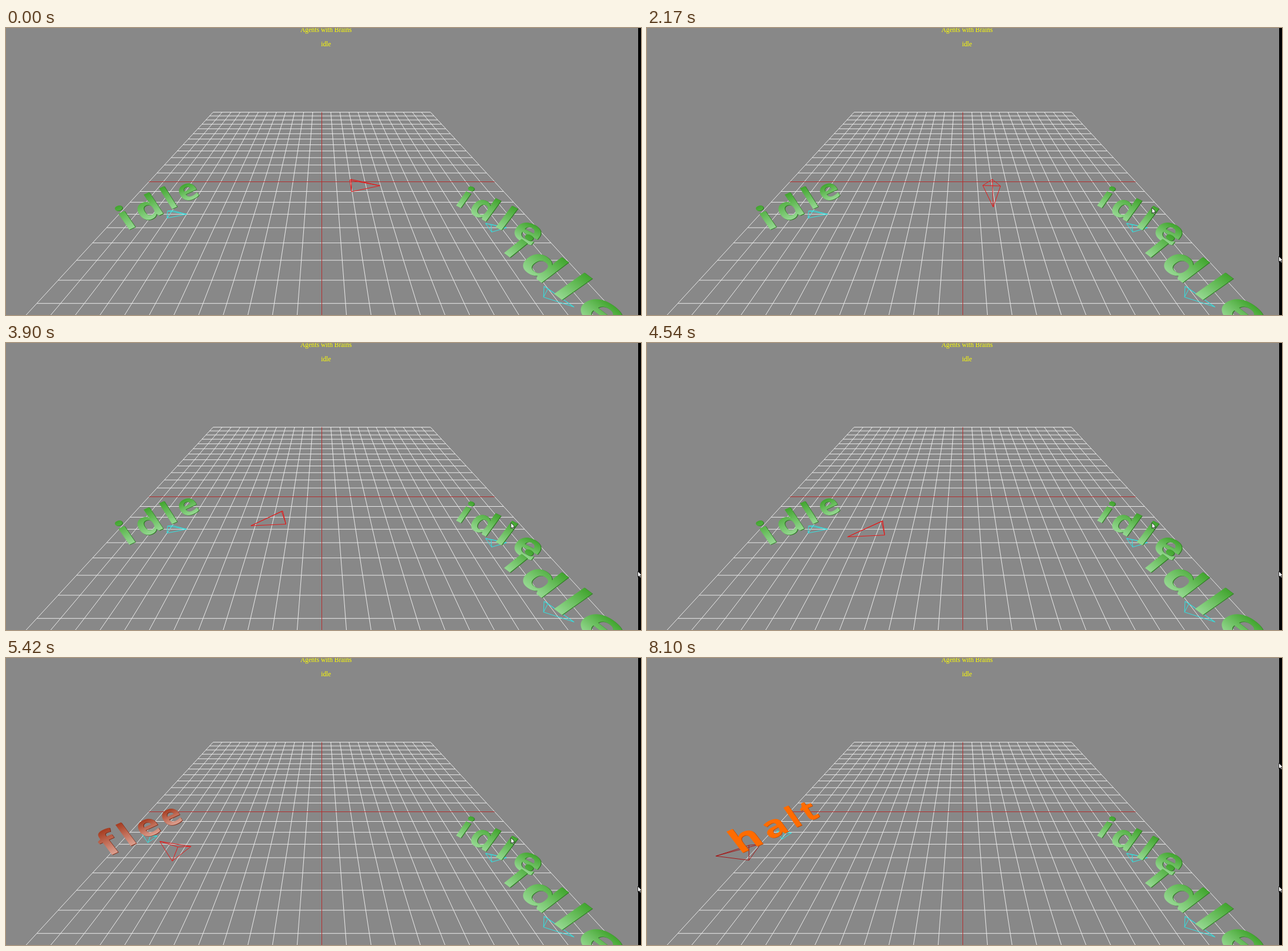
Write an HTML page with a canvas that moves like this. It is 1113 px wide and 503 px high and loops after 8.18 s.

```html
<!DOCTYPE html>
<html lang="en">
<head>
<meta charset="utf-8">
<title>Agents with Brains</title>
<style>
  html, body { margin: 0; width: 100%; height: 100%; overflow: hidden; background: #888; }
  canvas { display: block; }
</style>
</head>
<body>
<canvas id="stage" width="1113" height="503"></canvas>
<script>
const ctx = document.getElementById('stage').getContext('2d');
const LOOP = 8180;
const RAD = Math.PI / 180;

const ramp = (t, from, to) => Math.min(1, Math.max(0, (t - from) / (to - from)));
const mix = (a, b, p) => a + (b - a) * p;

// Camera at (0, 10, 12), looking at the origin
const CAM = { y: 10, z: 12, dist: Math.hypot(10, 12), focal: 394.4, cx: 553.5, cy: 269.5 };
const SIN = CAM.y / CAM.dist, COS = CAM.z / CAM.dist;

function project([x, y, z]) {
  const k = CAM.focal / (CAM.dist - y * SIN - z * COS);
  return [CAM.cx + x * k, CAM.cy - (y * COS - z * SIN) * k];
}

const MOODS = {
  idle: { top: '#41a52e', bottom: '#95d891', side: '#2f7a24' },
  flee: { top: '#a63c20', bottom: '#dca090', side: '#7e2a16' },
  halt: { top: '#ff6c00', bottom: '#ff6c00', side: '#bd4a00' }
};

// The hunter turns on the spot, then drives along its heading with two more turns
function hunterHeading(t) {
  return 159.7 * ramp(t, 1400, 2590) ** 1.25
    + 48 * ramp(t, 5180, 5420)
    - 36.4 * ramp(t, 5520, 5920);
}

// Steps the chase up to time t: the runner flees from a near hunter and halts at the edge
function chase(t) {
  const dt = 10, drive = 2708, stop = 6460, near = 3, edge = -10.8;
  const hunter = { x: 1.96, z: .42, turn: hunterHeading(t) };
  const runner = { x: -9, z: 3, turn: 0, mood: 'idle' };
  const move = (a, turn, dist) => {
    a.x += dist * Math.cos(turn * RAD);
    a.z += dist * Math.sin(turn * RAD);
  };
  for (let now = drive; now < Math.min(t, stop); now += dt) {
    const step = Math.min(dt, t - now) / 1000;
    move(hunter, hunterHeading(now), 3.88 * step);
    const dx = runner.x - hunter.x, dz = runner.z - hunter.z;
    if (runner.mood === 'idle' && Math.hypot(dx, dz) < near) runner.mood = 'flee';
    if (runner.mood === 'flee') {
      runner.turn = Math.atan2(dz, dx) / RAD;
      move(runner, runner.turn, 2.5 * step);
      if (runner.x < edge) runner.mood = 'halt';
    }
  }
  return { hunter, runner };
}

function line(...pts) {
  ctx.beginPath();
  pts.forEach(p => ctx.lineTo(...project(p)));
  ctx.stroke();
}

function drawGrid() {
  const n = 12;
  ctx.lineWidth = 1;
  ctx.strokeStyle = '#ececec';
  for (let i = -n; i <= n; i++) {
    if (!i) continue;
    line([-n, 0, i], [n, 0, i]);
    line([i, 0, -n], [i, 0, n]);
  }
  ctx.strokeStyle = '#b42c2c';
  line([-n, 0, 0], [n, 0, 0]);
  line([0, 0, -n], [0, 0, n]);
}

function drawAgent({ x, z, turn }, size, color) {
  const c = size * Math.cos(turn * RAD), s = size * Math.sin(turn * RAD), w = .3;
  const tip = [x + c, 0, z + s];
  const left = [x + w * s, 0, z - w * c];
  const right = [x - w * s, 0, z + w * c];
  const top = [x, .28 * size, z];
  ctx.strokeStyle = color;
  ctx.lineWidth = 1;
  line(left, right, tip, left, top, right);
  line(top, tip);
}

// Label standing at an agent and facing the camera
function drawLabel({ x, z, mood }) {
  const em = 1.85, gap = .12 * em, base = .22, px = 100, unit = em / px;
  const dx = -x, dz = CAM.z - z, flat = Math.hypot(dx, dz), full = Math.hypot(flat, CAM.y);
  const right = [dz / flat, 0, -dx / flat];
  const up = [-CAM.y * dx / flat / full, flat / full, -CAM.y * dz / flat / full];
  const at = (s, v) => project([0, 1, 2].map(i => [x, 0, z][i] + right[i] * s + up[i] * v));
  const { top, bottom, side } = MOODS[mood];

  ctx.font = `bold ${px}px "Open Sans", "DejaVu Sans", sans-serif`;
  ctx.textAlign = 'center';
  const widths = [...mood].map(ch => ctx.measureText(ch).width * unit);
  let pen = -widths.reduce((a, b) => a + b + gap, -gap) / 2 - .05;
  [...mood].forEach((ch, i) => {
    const high = 'ae'.includes(ch) ? 56 : 76;
    const s = pen + widths[i] / 2, v = base + high / 2 * unit, e = .05, k = unit / (2 * e);
    const [ox, oy] = at(s, v);
    const [rx, ry] = at(s + e, v), [lx, ly] = at(s - e, v);
    const [tx, ty] = at(s, v + e), [bx, by] = at(s, v - e);
    const face = ctx.createLinearGradient(0, -high / 2, 0, high / 2);
    face.addColorStop(0, top);
    face.addColorStop(1, bottom);
    for (const [shift, style] of [[1.2, side], [0, face]]) {
      ctx.setTransform((rx - lx) * k, (ry - ly) * k, (bx - tx) * k, (by - ty) * k, ox + shift, oy + shift / 2);
      ctx.fillStyle = style;
      ctx.fillText(ch, 0, high / 2);
    }
    ctx.resetTransform();
    pen += widths[i] + gap;
  });
}

const ARROW = new Path2D('M0 0V10L2.3 8L4 11.3L5.5 10.6L4 7.4H7Z');

function drawCursor(x, y) {
  ctx.save();
  ctx.translate(x, y);
  ctx.fillStyle = '#fff';
  ctx.strokeStyle = '#111';
  ctx.lineWidth = .8;
  ctx.fill(ARROW);
  ctx.stroke(ARROW);
  ctx.restore();
}

// The pointer enters from the right edge, rests, and swings back out; a stale copy stays behind
function drawCursors(t) {
  if (t < 150) return;
  const edge = 1107.5, enterY = 400, leaveY = 184, restX = 885, restY = 315;
  const enter = ramp(t, 150, 650), leave = ramp(t, 7050, 7750);
  const swing = 290 * Math.sin(Math.PI * leave);
  drawCursor(edge, enterY);
  drawCursor(
    mix(mix(edge, restX, enter), edge, leave),
    mix(mix(enterY, restY, enter), leaveY, leave) + swing * (1 - leave * .3)
  );
}

function drawTitle() {
  ctx.font = '11.7px "Liberation Serif", "Times New Roman", serif';
  ctx.textAlign = 'center';
  ctx.fillStyle = '#ff0';
  ctx.fillText('Agents with Brains', 561, 6.5);
  ctx.fillText('idle', 561, 32);
}

function draw(t) {
  ctx.fillStyle = '#888';
  ctx.fillRect(0, 0, 1113, 503);
  drawGrid();

  const { hunter, runner } = chase(t);
  const agents = [
    runner,
    { x: 9.3, z: 4, turn: 0, mood: 'idle' },
    { x: 9.72, z: 7.51, turn: 39, mood: 'idle' }
  ];
  agents.forEach(a => drawAgent(a, 1, '#2ee6e6'));
  drawAgent(hunter, 2, `rgb(${mix(232, 165, ramp(t, 7750, 8100))}, 22, 22)`);
  agents.forEach(drawLabel);

  ctx.fillStyle = '#000';
  ctx.fillRect(1108, 0, 5, 503);
  drawTitle();
  drawCursors(t);
}

const start = performance.now();
function tick() {
  draw((performance.now() - start) % LOOP);
  requestAnimationFrame(tick);
}
tick();
</script>
</body>
</html>
```
